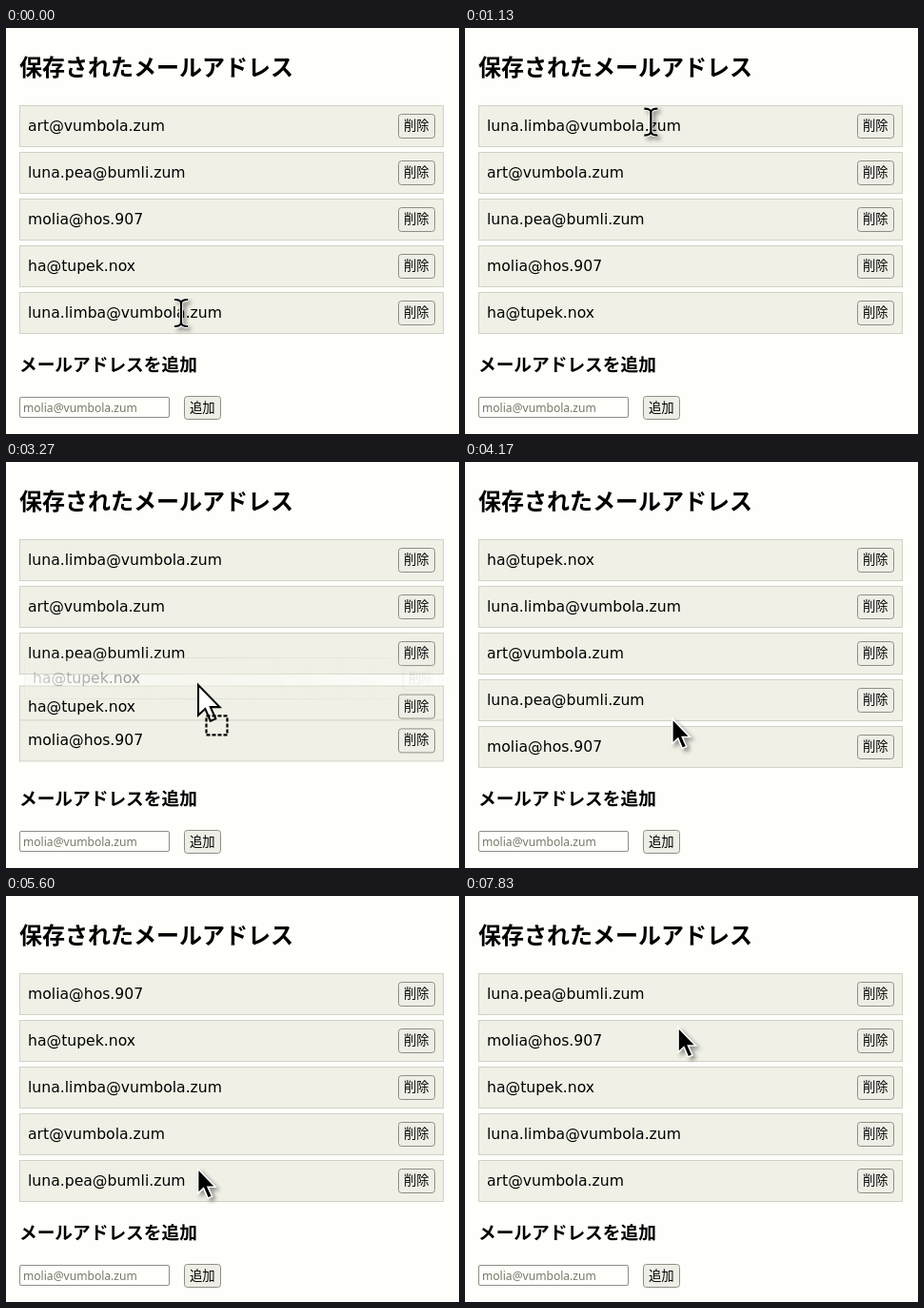
Recreate the animation shown at these times as an HTML page. Size 476 by 426 pixels, loop 8000 ms.

```html
<!DOCTYPE html>
<html lang="ja">
<head>
<meta charset="utf-8">
<style>
  html, body { margin: 0; width: 100%; height: 100%; overflow: hidden; background: #fefefb; }
  svg { display: block; }
  text { font-family: "Noto Sans CJK JP", "Noto Sans CJK", sans-serif; font-size: 13.33px; }
  .title { font-size: 24px; font-weight: bold; }
  .subtitle { font-size: 18.7px; font-weight: bold; }
  .mail { font-family: "DejaVu Sans", sans-serif; font-size: 15.65px; }
  .hint { font-family: "Noto Sans", sans-serif; font-size: 12.1px; fill: #777768; }
  .row { fill: #f0f0e6; stroke: #d1d1c6; }
  .button { fill: #eeeee6; stroke: #8e8e86; }
  .shadow { filter: drop-shadow(3px 3px 2px rgba(0, 0, 0, .4)); }
</style>
</head>
<body>
<svg width="476" height="426" viewBox="0 0 476 426">
  <defs>
    <radialGradient id="fade" gradientUnits="userSpaceOnUse" r="250">
      <stop offset="0" stop-color="#fff" stop-opacity=".55"/>
      <stop offset="1" stop-color="#fff" stop-opacity=".04"/>
    </radialGradient>
    <mask id="ghostMask" maskUnits="userSpaceOnUse" x="-60" y="-60" width="600" height="540">
      <rect x="-60" y="-60" width="600" height="540" fill="url(#fade)"/>
    </mask>
  </defs>
  <text class="title" x="14" y="50">保存されたメールアドレス</text>
  <g id="rows"></g>
  <text class="subtitle" x="14" y="360">メールアドレスを追加</text>
  <rect x="14.5" y="387.5" width="157" height="21" rx="1.5" fill="#fefefb" stroke="#8e8e86"/>
  <text class="hint" x="18" y="403">molia@vumbola.zum</text>
  <rect class="button" x="187.5" y="386.5" width="38" height="24" rx="3"/>
  <text x="193" y="403">追加</text>
  <g id="ghost" mask="url(#ghostMask)"></g>
  <g id="pointer"></g>
</svg>
<script>
const LOOP = 8000, TOP = 81, PITCH = 49, ROW_HEIGHT = 44, SHIFT_MS = 150, DROP_MS = 40;
const mails = ['art@vumbola.zum', 'luna.pea@bumli.zum', 'molia@hos.907',
  'ha@tupek.nox', 'luna.limba@vumbola.zum'];
const items = mails.map((_, i) => i);

const clamp = p => Math.min(1, Math.max(0, p));
const smooth = p => p * p * (3 - 2 * p);
const easeOut = p => 1 - (1 - p) ** 2;

// Pointer strokes: each runs from where the last one stopped to (x, y).
const home = { x: 184, y: 299 };
const move = (start, end, x, y) => ({ start, end, x, y, ease: easeOut });
const drag = (start, end, x, y) => ({ start, end, x, y, ease: smooth, drag: true });
const strokes = [
  drag(30, 830, 195, 84), move(900, 2070, 196, 125), move(2270, 2830, 197, 306),
  drag(3000, 3700, 212, 90), move(3800, 4430, 219, 306),
  drag(4700, 5230, 206, 95), move(5280, 5770, 201, 312),
  drag(5900, 6530, 218, 77), move(6570, 7000, 222, 100), move(7230, 7830, 224, 138)
];
const drags = strokes.filter(s => s.drag);

const pointerAt = t => strokes.reduce((p, s) => {
  const k = s.ease(clamp((t - s.start) / (s.end - s.start)));
  return { x: p.x + (s.x - p.x) * k, y: p.y + (s.y - p.y) * k };
}, home);

// Each time the dragged last row enters the row above, the two swap places.
const swaps = [];
drags.forEach(({ start, end }, n) => {
  let slot = 3;
  for (let time = start; time < end && slot >= 0; time++) {
    if (pointerAt(time).y <= TOP + ROW_HEIGHT + PITCH * slot) {
      swaps.push({ item: 4 - n, dir: -1, time }, { item: (slot - n + 5) % 5, dir: 1, time });
      slot--;
    }
  }
});

const slotOf = (item, t, ease) => swaps.reduce((slot, s) =>
  s.item === item ? slot + s.dir * ease(clamp((t - s.time) / SHIFT_MS)) : slot, item);
const rowTop = (item, t) => TOP + PITCH * slotOf(item, t, easeOut);

const rowMarkup = (item, x, y) => `<g transform="translate(${x} ${y})">
  <rect class="row" x=".5" y=".5" width="445" height="43"/>
  <text class="mail" x="9" y="27">${mails[item]}</text>
  <rect class="button" x="398.5" y="9.5" width="38" height="25" rx="3"/>
  <text x="404" y="26">削除</text></g>`;

const arrow = 'M0 0V26L6 20.5L10.5 31L15 29L10.5 19H18.5Z';
const beam = 'M-7-14Q0-14 0-10V10Q0 14-7 14M7-14Q0-14 0-10M0 10Q0 14 7 14';
const cursors = {
  arrow: `<path class="shadow" d="${arrow}" stroke="#fff" stroke-width="1.6"/>`,
  beam: `<g class="shadow" fill="none"><path d="${beam}" stroke="#fff" stroke-width="4"/>
    <path d="${beam}" stroke="#000" stroke-width="2.2"/></g>`,
  drag: `<path d="${arrow}" transform="scale(1.22)" fill="#fff" stroke="#000" stroke-width="1.7"/>
    <rect x="8.5" y="32.5" width="22" height="20" fill="none" stroke="#000" stroke-width="2.2" stroke-dasharray="4 2"/>`
};

const [rows, ghost, pointer, fade] =
  ['rows', 'ghost', 'pointer', 'fade'].map(id => document.getElementById(id));

function draw(t) {
  const { x, y } = pointerAt(t);
  const order = item => slotOf(item, t, Math.ceil);
  rows.innerHTML = [...items].sort((a, b) => order(a) - order(b))
    .map(i => rowMarkup(i, 14, rowTop(i, t))).join('');

  const n = drags.findIndex(d => t >= d.start && t < d.end + DROP_MS);
  const dragging = n >= 0;
  ghost.innerHTML = '';
  if (dragging) {
    const grab = pointerAt(drags[n].start);
    ghost.innerHTML = rowMarkup(4 - n, 14 + x - grab.x, TOP + 4 * PITCH + y - grab.y);
    fade.setAttribute('cx', x);
    fade.setAttribute('cy', y);
  }

  const overText = items.some(i => x > 22 && x < 23 + 9.27 * mails[i].length &&
    Math.abs(y - rowTop(i, t) - ROW_HEIGHT / 2) < 11);
  pointer.innerHTML = cursors[dragging ? 'drag' : overText ? 'beam' : 'arrow'];
  pointer.setAttribute('transform', `translate(${x} ${y})`);
}

const begin = performance.now();
function tick() {
  draw((performance.now() - begin) % LOOP);
  requestAnimationFrame(tick);
}
tick();
</script>
</body>
</html>
```
